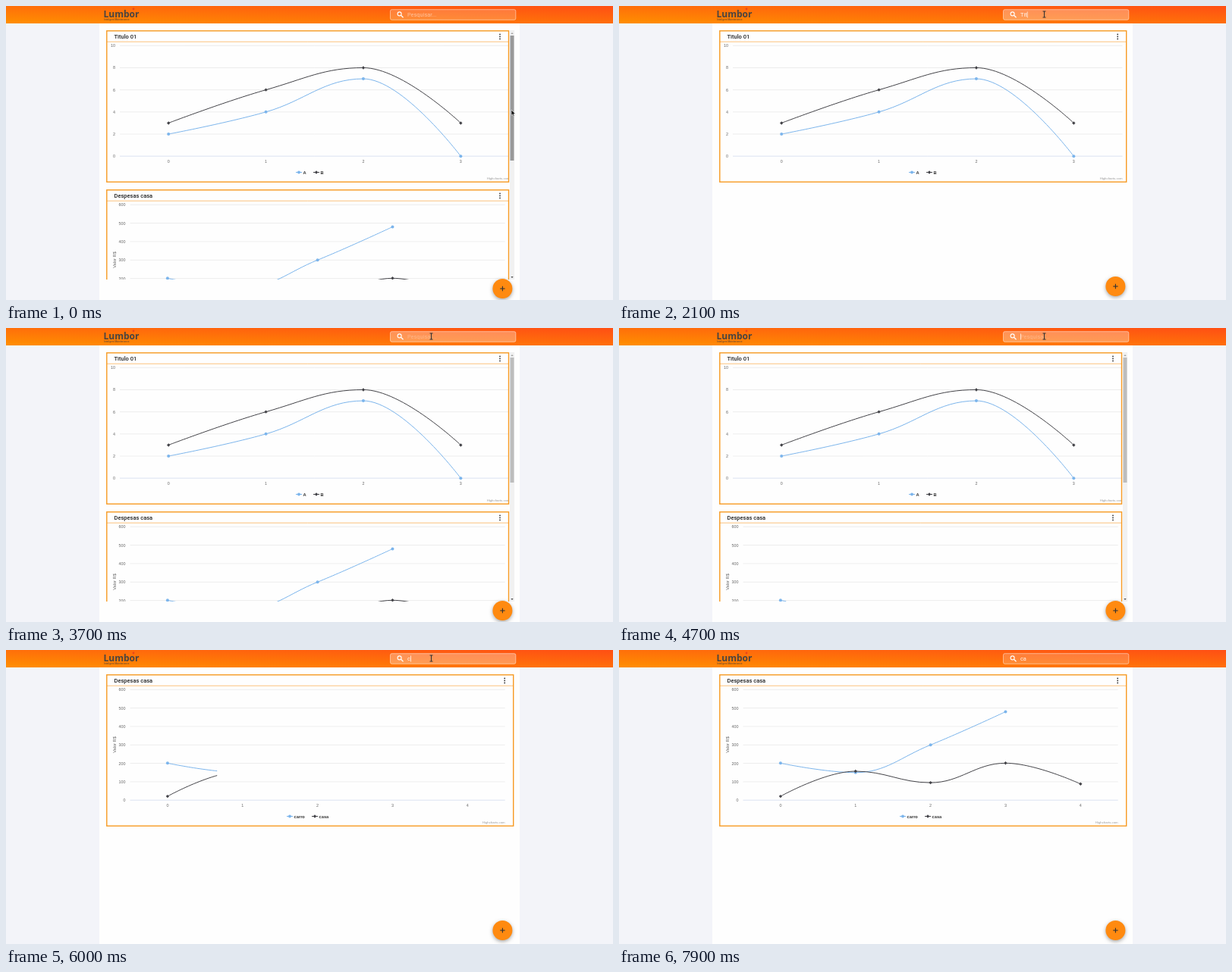
An HTML page with a canvas that plays this animation: 800 by 388 pixels, repeating every 8 s.

```html
<!DOCTYPE html>
<html lang="pt">
<head>
<meta charset="utf-8">
<title>Painel</title>
<style>
html, body { margin: 0; width: 100%; height: 100%; overflow: hidden; background: #f3f4f9; }
canvas { display: block; }
</style>
</head>
<body>
<canvas id="stage" width="800" height="388"></canvas>
<script>
const ctx = document.getElementById('stage').getContext('2d');
const LOOP = 8000, STEP = 100;
const ROBOTO = 'Roboto, sans-serif', ARIAL = '"Liberation Sans", Arial, sans-serif';
const BLUE = '#7cb5ec', DARK = '#434348', ORANGE = '#f79a22';
const FOCUS = 850, BLUR = 7500, DRAG_END = 600;

// Search text over time
const keys = [
  [0, ''], [1500, 'T'], [1700, 'Ti'], [1900, 'Tit'], [2400, 'd'], [2850, ''],
  [3900, 'T'], [4100, 'Ti'], [4300, 'T'], [4480, ''], [5300, 'C'], [5400, 'Ca'],
  [5680, ''], [6000, 'c'], [6300, 'ca']
];
// Pointer: time, x, y
const path = [
  [0, 666, 137], [300, 682, 182], [600, 690, 137], [900, 560.5, 11], [6500, 560.5, 11],
  [7000, 300, 140], [7400, 44, 92], [7800, 25, -14], [8000, 25, -14]
];
const charts = [
  {
    title: 'Titulo 01', left: 150, right: 663.5, max: 10, tick: 2, cats: 4, labelX: 144,
    series: [
      { name: 'A', color: BLUE, data: [2, 4, 7, 0], legendX: 382 },
      { name: 'B', color: DARK, data: [3, 6, 8, 3], legendX: 405 }
    ]
  },
  {
    title: 'Despesas casa', left: 163.5, right: 657.7, max: 600, tick: 100, cats: 5, labelX: 157.5,
    axis: 'Valor R$',
    series: [
      { name: 'carro', color: BLUE, data: [201, 150, 300, 480], legendX: 370 },
      { name: 'casa', color: DARK, data: [21, 157, 95, 201, 88], legendX: 403 }
    ]
  }
];

function text(str, x, y, font, color, align = 'left') {
  ctx.font = font;
  ctx.fillStyle = color;
  ctx.textAlign = align;
  ctx.fillText(str, x, y);
}
function box(x, y, w, h, color) {
  ctx.fillStyle = color;
  ctx.fillRect(x, y, w, h);
}
function line(x1, y1, x2, y2, color, width) {
  ctx.beginPath();
  ctx.moveTo(x1, y1);
  ctx.lineTo(x2, y2);
  ctx.strokeStyle = color;
  ctx.lineWidth = width;
  ctx.stroke();
}
function poly(points, color) {
  ctx.beginPath();
  points.forEach(([x, y]) => ctx.lineTo(x, y));
  ctx.closePath();
  ctx.fillStyle = color;
  ctx.fill();
}
function dot(x, y, r, color) {
  ctx.beginPath();
  ctx.arc(x, y, r, 0, Math.PI * 2);
  ctx.fillStyle = color;
  ctx.fill();
}
function clipTo(x, y, w, h) {
  ctx.save();
  ctx.beginPath();
  ctx.rect(x, y, w, h);
  ctx.clip();
}
function marker(x, y, color) {
  if (color === BLUE) dot(x, y, 2, color);
  else poly([[x, y - 2.2], [x + 2.2, y], [x, y + 2.2], [x - 2.2, y]], color);
}

// Smooth curve whose handles never overshoot the neighbouring points
function spline(pts) {
  const s = 1.5, d = s + 1;
  let out = pts[0];
  ctx.beginPath();
  ctx.moveTo(...pts[0]);
  for (let i = 1; i < pts.length; i++) {
    const [x, y] = pts[i], [px, py] = pts[i - 1];
    let into = [x, y], next = [x, y];
    if (i < pts.length - 1) {
      const [nx, ny] = pts[i + 1];
      const lx = (s * x + px) / d, rx = (s * x + nx) / d;
      let ly = (s * y + py) / d, ry = (s * y + ny) / d;
      const shift = (ry - ly) * (rx - x) / (rx - lx) + y - ry;
      ly += shift;
      ry += shift;
      const lc = Math.min(Math.max(ly, Math.min(py, y)), Math.max(py, y));
      if (lc !== ly) { ly = lc; ry = 2 * y - ly; }
      const rc = Math.min(Math.max(ry, Math.min(ny, y)), Math.max(ny, y));
      if (rc !== ry) { ry = rc; ly = 2 * y - ry; }
      into = [lx, ly];
      next = [rx, ry];
    }
    ctx.bezierCurveTo(...out, ...into, x, y);
    out = next;
  }
  ctx.stroke();
}

function drawChart(c, top, right, shown) {
  const base = top + 166.2, height = 145.9, step = (c.right - c.left) / c.cats;
  const px = i => c.left + step * (i + 0.5);
  const py = v => base - v / c.max * height;
  const small = '5.4px ' + ARIAL;

  clipTo(132, top - 1, right - 132, 202);
  box(132, top, right - 132, 200, '#fefefe');
  for (let v = 0; v <= c.max; v += c.tick) {
    line(c.left, py(v), c.right, py(v), v ? '#e6e6e6' : '#ccd6eb', 0.7);
    text(v, c.labelX, py(v) + 2, small, '#666', 'right');
  }
  for (let i = 0; i < c.cats; i++) text(i, px(i), top + 175, small, '#666', 'center');
  if (c.axis) {
    ctx.save();
    ctx.translate(144.5, top + 93);
    ctx.rotate(-Math.PI / 2);
    text(c.axis, 0, 0, '5.7px ' + ARIAL, '#666', 'center');
    ctx.restore();
  }
  for (const s of c.series) {
    line(s.legendX, top + 187.5, s.legendX + 8, top + 187.5, s.color, 1);
    marker(s.legendX + 4, top + 187.5, s.color);
    text(s.name, s.legendX + 9.6, top + 189.5, 'bold 5.7px ' + ARIAL, '#333');
  }
  text('Highcharts.com', c.right, top + 197.3, '4.3px ' + ARIAL, '#999', 'right');

  clipTo(c.left, top + 16, (c.right - c.left) * shown, 160);
  for (const s of c.series) {
    const pts = s.data.map((v, i) => [px(i), py(v)]);
    ctx.strokeStyle = s.color;
    ctx.lineWidth = 1;
    spline(pts);
    pts.forEach(p => marker(...p, s.color));
  }
  ctx.restore();
  ctx.restore();

  text(c.title, 142.5, top + 10.8, '500 7.5px ' + ROBOTO, '#222');
  const menuX = right - 11.5;
  for (let i = -1; i < 2; i++) dot(menuX, top + 8.4 + i * 3, 0.9, '#333');
  line(133, top + 15.2, right, top + 15.2, '#fbbd6c', 0.9);
  ctx.strokeStyle = ORANGE;
  ctx.lineWidth = 1.4;
  ctx.strokeRect(132.8, top + 0.8, right - 132.8, 199.4);
}

function drawEmpty() {
  const gray = '#7a7a7a';
  box(382.5, 173.5, 3, 32.5, gray);
  box(382.5, 203, 35, 3, gray);
  [[389.7, 191], [396.4, 183], [403.2, 187], [410, 180]].forEach(([x, y]) => box(x, y, 3.4, 19 + 180 - y, gray));
  text('Não há gráficos a serem exibidos', 400, 220.3, '7.5px ' + ROBOTO, '#222', 'center');
}

function drawScrollbar(scroll, active) {
  box(664, 32, 6, 329, '#f1f1f1');
  box(664.5, 39 + scroll / 2, 5, 165, active ? '#999' : '#bdbdbd');
  poly([[665.3, 37], [668.7, 37], [667, 35]], '#a3a3a3');
  poly([[665.3, 357], [668.7, 357], [667, 359]], '#505050');
}

function drawHeader(t, value, keyTime) {
  const w = 800, h = 23, k = w * h / (w * w + h * h);
  const g = ctx.createLinearGradient(w / 2 - h * k, h / 2 + w * k, w / 2 + h * k, h / 2 - w * k);
  g.addColorStop(0, '#ff8f00');
  g.addColorStop(1, '#ff4f14');
  box(0, 0, w, h, g);

  text('Lumbor', 128.5, 14.8, 'bold 12px "Open Sans", sans-serif', '#4a4440');
  text('Inteligent Maintenance', 129, 19, '3.3px ' + ROBOTO, '#5c4433');
  dot(168, 4, 1.4, '#e8481c');

  const focused = t >= FOCUS && t < BLUR;
  ctx.beginPath();
  ctx.roundRect(506.5, 4.7, 165.3, 13.6, 2);
  ctx.fillStyle = `rgba(255,255,255,${focused ? 0.3 : 0.18})`;
  ctx.fill();
  ctx.strokeStyle = 'rgba(255,255,255,.6)';
  ctx.lineWidth = 0.8;
  ctx.stroke();

  ctx.beginPath();
  ctx.arc(518.6, 10.4, 2.5, 0, Math.PI * 2);
  ctx.strokeStyle = '#fff';
  ctx.lineWidth = 1.1;
  ctx.stroke();
  line(520.5, 12.3, 523.5, 15.2, '#fff', 1.3);

  const font = '7.4px ' + ROBOTO;
  if (value) text(value, 529, 14.3, font, 'rgba(255,255,255,.92)');
  else text('Pesquisar...', 529, 14.3, font, `rgba(255,255,255,${focused ? 0.3 : 0.5})`);
  if (focused && (t - Math.max(keyTime, FOCUS)) % 1000 < 500) {
    ctx.font = font;
    box(529.2 + ctx.measureText(value).width, 7.5, 0.7, 8, '#fff');
  }
}

function drawFab(y) {
  ctx.save();
  ctx.shadowColor = 'rgba(0,0,0,.35)';
  ctx.shadowBlur = 5;
  ctx.shadowOffsetY = 1.8;
  dot(654.4, y, 13, '#ff8a10');
  ctx.restore();
  line(651.2, y, 657.6, y, '#333', 1.1);
  line(654.4, y - 3.2, 654.4, y + 3.2, '#333', 1.1);
}

function pointerAt(t) {
  let i = 0;
  while (i < path.length - 2 && path[i + 1][0] <= t) i++;
  const [t0, x0, y0] = path[i], [t1, x1, y1] = path[i + 1];
  const u = (t - t0) / (t1 - t0), e = u * u * (3 - 2 * u);
  return [x0 + (x1 - x0) * e, y0 + (y1 - y0) * e];
}

function drawPointer(x, y) {
  if (x > 506 && x < 672 && y > 4 && y < 19) {
    line(x, y - 4, x, y + 4, '#333', 1.1);
    line(x - 2, y - 4, x + 2, y - 4, '#333', 1);
    line(x - 2, y + 4, x + 2, y + 4, '#333', 1);
    return;
  }
  const shape = [[0, 0], [0, 7.4], [1.7, 5.9], [2.8, 8.5], [4.1, 7.9], [3, 5.4], [5.3, 5.3]];
  poly(shape.map(([dx, dy]) => [x + dx, y + dy]), '#111');
  ctx.strokeStyle = '#fff';
  ctx.lineWidth = 0.6;
  ctx.stroke();
}

// Current query and the moment each chart last appeared
function stateAt(t) {
  const born = charts.map(() => -2000);
  let visible = charts, value = '', keyTime = 0;
  for (const [time, str] of keys) {
    if (time > t) break;
    const found = charts.filter(c => c.title.includes(str));
    charts.forEach((c, i) => {
      if (found.includes(c) && !visible.includes(c)) born[i] = time;
    });
    visible = found;
    value = str;
    keyTime = time;
  }
  return { born, visible, value, keyTime };
}

function draw(t) {
  const { born, visible, value, keyTime } = stateAt(t);
  const [mx, my] = pointerAt(t);
  const many = visible.length > 1;
  const scroll = t < DRAG_END ? (my - 137) * 2 : 0;

  box(0, 0, 800, 388, '#f3f4f9');
  box(123, 23, 554, 365, '#fefefe');

  clipTo(123, 31, 554, many ? 330 : 357);
  visible.forEach((c, i) => {
    const u = Math.min(1, (t - born[charts.indexOf(c)]) / 1000);
    drawChart(c, 32 + i * 210 - scroll, many ? 662.5 : 668.7, (1 - Math.cos(Math.PI * u)) / 2);
  });
  if (many) drawScrollbar(scroll, t < DRAG_END);
  ctx.restore();

  if (!visible.length) drawEmpty();
  drawHeader(t, value, keyTime);
  drawFab(many ? 373 : 370);
  drawPointer(mx, my);
}

const start = performance.now();
function tick() {
  const t = (performance.now() - start) % LOOP;
  draw(Math.floor(t / STEP) * STEP);
  requestAnimationFrame(tick);
}
tick();
</script>
</body>
</html>
```
